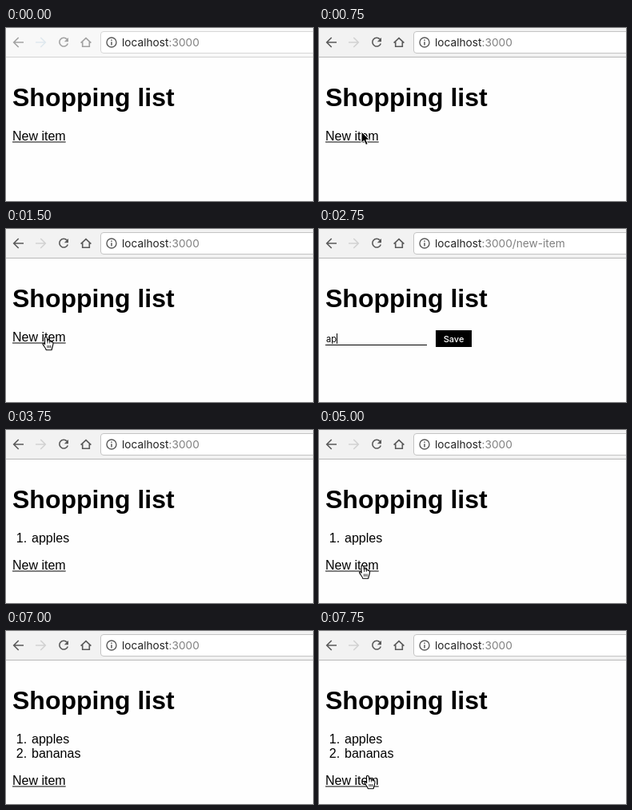
These frames come from a looping animation (384 by 217 pixels, 8 s). An HTML page:

```html
<!DOCTYPE html>
<html lang="en">
<head>
<meta charset="utf-8">
<title>Shopping list</title>
<style>
html, body { margin: 0; width: 100%; height: 100%; overflow: hidden; background: #fefefe; }
svg { display: block; width: 384px; height: 217px; }
text { white-space: pre; }
.page { font: 16px "Liberation Sans", Arial, sans-serif; }
.page h1, .title { font-size: 32px; font-weight: bold; }
.control { font: 11px Inter, sans-serif; }
.url { font: 13.7px Inter, sans-serif; }
.icon { fill: none; stroke-width: 1.6; }
</style>
</head>
<body>
<svg viewBox="0 0 384 217">
  <rect width="384" height="217" fill="#fefefe"/>
  <rect id="bar" width="384" height="36"/>
  <path id="edge" d="M0 36.5H384"/>
  <rect id="field" x="118.5" y="4.5" width="280" height="27" rx="3.5" fill="#fff"/>
  <g class="icon">
    <g id="icons">
      <path d="M22 18H10M15.7 12L9.7 18L15.7 24"/>
      <path d="M76.3 14.1A5.4 5.4 0 1 0 77.3 19.5"/>
      <path d="M78 12V17.2H72.8Z" stroke="none" id="reloadTip"/>
      <path d="M93.6 18.7L100 12.6L106.4 18.7M95.7 17.5V23.3H104.3V17.5"/>
    </g>
    <path id="forward" d="M37 18H49M43.3 12L49.3 18L43.3 24"/>
    <circle cx="132" cy="18" r="6" stroke="#5a5a5a" stroke-width="1.4"/>
    <path d="M132 17.2V21.4M132 14.5V16" stroke="#5a5a5a" stroke-width="1.5"/>
  </g>
  <text class="url" x="145" y="23" fill="#222">localhost<tspan id="path" fill="#808080"></tspan></text>

  <g class="page">
    <text class="title" x="8" y="98">Shopping list</text>
    <g id="items"></g>
    <g id="link">
      <text x="8" y="141">New item</text>
      <path d="M8 143H74.7" stroke="#000" stroke-width="1"/>
    </g>
  </g>
  <g id="form" class="control">
    <text id="entry" x="9" y="142"></text>
    <rect id="caret" y="131" width="1" height="13"/>
    <rect x="8" y="145" width="127" height="1"/>
    <rect x="146" y="127" width="45" height="21"/>
    <text x="155.7" y="142" fill="#fff" font-weight="500">Save</text>
  </g>

  <path id="arrow" d="M0 0V14.2L3.3 11.2L5.6 16.6L8.2 15.5L5.9 10.2H10.3Z" fill="#000" stroke="#fff" stroke-width="1"/>
  <g id="hand" stroke-linejoin="round">
    <path d="M-1.5 1.2C-1.5-.5 1.2-.5 1.4 1.2L2 5.2C3-.0 4.4 4.3 4.7 5.8C5.5 4.7 6.8 5.1 7 6.4C8.2 5.7 9 6.5 9 7.8C9.1 11 7.6 12.4 7.2 16.2H.2C-.3 13.4-3 11.4-4 8.8C-4.2 7.4-2.4 7.3-1.4 9.2Z" fill="#fff" stroke="#000" stroke-width="1.1"/>
    <path d="M1.9 10.5V13.8M3.8 10.5V13.8M5.7 10.5V13.8M2 5V8M4.7 5.8V8" fill="none" stroke="#000" stroke-width=".8"/>
  </g>
</svg>
<script>
const LOOP = 8000, TICK = 250;
const $ = id => document.getElementById(id);
const set = (id, attrs) => Object.entries(attrs).forEach(([k, v]) => $(id).setAttribute(k, v));
const show = (id, on) => set(id, { visibility: on ? "visible" : "hidden" });
const latest = (track, t) => track.filter(([start]) => start <= t).pop()?.[1];

const pages = [[0, "list"], [1750, "form"], [3750, "list"], [5500, "form"], [7000, "list"]];
const lists = [[0, []], [3750, ["apples"]], [7000, ["apples", "bananas"]]];
const typed = [[0, ""], [2500, "a"], [2750, "ap"], [3250, "appl"], [3500, "apples"],
  [3750, ""], [6250, "ba"], [6500, "banan"], [6750, "bananas"]];
const carets = [[0, true], [2000, false], [2500, true], [5750, false], [6250, true]];
const pointers = [
  [250, ["arrow", 92, 112]], [500, ["arrow", 70, 122]], [750, ["arrow", 53, 130]],
  [1000, ["arrow", 47, 133]], [1250, ["hand", 50, 135.5]], [1750, null],
  [4500, ["arrow", 51, 140]], [4750, ["hand", 54, 166]], [5000, ["hand", 54.5, 170]], [5500, null],
  [7500, ["hand", 57, 178]], [7750, ["hand", 61, 181.5]]
];

function drawToolbar(active) {
  const ink = active ? "#5a5a5a" : "#a2a2a2";
  set("bar", { fill: active ? "#f2f2f2" : "#f8f8f8" });
  set("edge", { stroke: active ? "#b8b8b8" : "#d2d2d2" });
  set("field", { stroke: active ? "#c4c4c4" : "#d6d6d6" });
  set("icons", { stroke: ink });
  set("reloadTip", { fill: ink });
  set("forward", { stroke: active ? "#d2d2d2" : "#dfe8ee" });
}

function drawItems(items) {
  $("items").innerHTML = items.map((name, i) => {
    const y = 141 + 18 * i;
    return `<text x="12.8" y="${y}">${i + 1}.</text><text x="32" y="${y}">${name}</text>`;
  }).join("");
}

function render(time) {
  const t = Math.floor((time % LOOP) / TICK) * TICK;
  const isForm = latest(pages, t) === "form";
  const items = latest(lists, t);
  const shift = items.length ? 16 + 18 * items.length : 0;

  drawToolbar(t >= 500);
  drawItems(items);
  $("path").textContent = isForm ? ":3000/new-item" : ":3000";

  for (const id of ["link", "form"]) set(id, { transform: `translate(0 ${shift})` });
  show("link", !isForm);
  show("form", isForm);
  $("entry").textContent = latest(typed, t);
  set("caret", { x: Math.round(9 + $("entry").getComputedTextLength()) });
  show("caret", isForm && latest(carets, t));

  const [kind, x, y] = latest(pointers, t) || [];
  for (const id of ["arrow", "hand"]) {
    show(id, id === kind);
    if (id === kind) set(id, { transform: `translate(${x} ${y})` });
  }
}

const origin = performance.now();
function loop() {
  render(performance.now() - origin);
  requestAnimationFrame(loop);
}
loop();
</script>
</body>
</html>
```
